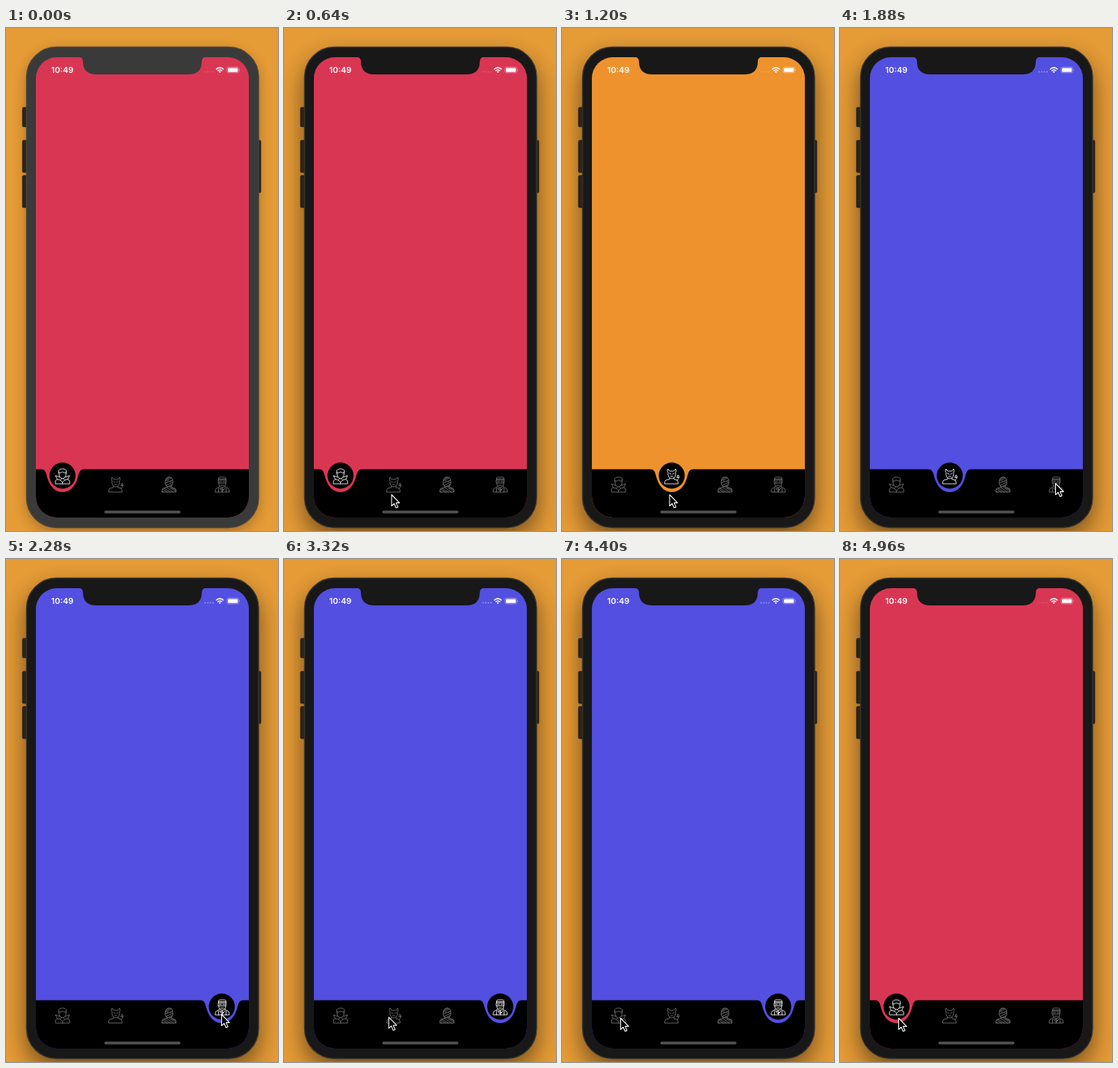
Recreate the animation shown at these times as an HTML page. Size 364 px wide and 672 px high, loop 5000 ms.

```html
<!DOCTYPE html>
<html lang="en">
<head>
<meta charset="utf-8">
<title>Curved tab bar</title>
<style>
html, body { margin: 0; width: 100%; height: 100%; overflow: hidden; background: #e59b36; }
svg { display: block; width: 100vw; height: 100vh; }
.time { font: 600 11px Inter, Roboto, sans-serif; fill: #fff; }
.icon { fill: none; stroke-width: .85; stroke-linejoin: round; stroke-linecap: round; }
</style>
</head>
<body>
<svg viewBox="0 0 364 672">
  <defs>
    <clipPath id="screen"><rect x="40" y="39" width="285" height="615" rx="28"/></clipPath>
    <filter id="wide" x="-40%" y="-20%" width="180%" height="140%"><feGaussianBlur stdDeviation="15"/></filter>
    <filter id="soft" x="-40%" y="-20%" width="180%" height="140%"><feGaussianBlur stdDeviation="9"/></filter>
  </defs>
  <rect width="364" height="672" fill="#e59b36"/>
  <rect id="shadowOn" x="25" y="38" width="315" height="644" rx="42" opacity=".46" filter="url(#wide)"/>
  <rect id="shadowOff" x="27" y="31" width="311" height="643" rx="42" opacity=".28" filter="url(#soft)"/>

  <g fill="#2b241a" stroke="#17140f" stroke-width=".6">
    <rect x="22" y="106" width="7" height="26" rx="1.5"/>
    <rect x="22" y="150" width="7" height="43" rx="1.5"/>
    <rect x="22" y="197" width="7" height="43" rx="1.5"/>
    <rect x="335" y="150" width="6" height="70" rx="1.5"/>
  </g>
  <rect id="body" x="27.5" y="25.5" width="310.5" height="642" rx="40" stroke-width="1.4"/>

  <g clip-path="url(#screen)">
    <rect class="tint" x="40" y="39" width="285" height="615"/>
    <rect x="40" y="589.5" width="285" height="65"/>
    <g id="dent">
      <path class="tint" d="M-29 589C-22 589.5-22 596-20 602C-16.500 613-9.500 620 0 620S16.500 613 20 602C22 596 22 589.500 29 589Z"/>
      <circle cy="598" r="17.400"/>
    </g>
    <g id="icons"></g>
    <rect x="131.500" y="644.700" width="102" height="3.800" rx="1.900" fill="#505050"/>
  </g>
  <path id="notch" d="M97 38.500Q103 39 103 45Q103 62 121 62H244Q262 62 262 45Q262 39 268 38.500Z"/>

  <text class="time" x="60.500" y="60">10:49</text>
  <g id="dots" fill="#fff">
    <circle cx="266.500" cy="58.500" r="1"/><circle cx="270" cy="58.500" r="1"/>
    <circle cx="273.500" cy="58.500" r="1"/><circle cx="277" cy="58.500" r="1"/>
  </g>
  <g fill="none" stroke="#fff" stroke-width="1.500">
    <path d="M281 55.200Q286.200 50.500 291.400 55.200M283 57.300Q286.200 54.600 289.400 57.300"/>
    <path d="M284.600 58.400Q286.200 57.200 287.800 58.400L286.200 60Z" fill="#fff" stroke="none"/>
  </g>
  <rect x="295.800" y="52.300" width="15.600" height="7.600" rx="2.200" fill="none" stroke="#fff" stroke-width=".7" stroke-opacity=".55"/>
  <rect x="297" y="53.400" width="13.200" height="5.400" rx="1.300" fill="#fff"/>
  <path d="M312.300 54.800Q313.700 56.100 312.300 57.400Z" fill="#fff" opacity=".6"/>

  <path id="cursor" d="M0 0V15L3.400 11.900L6 17.600L8.500 16.500L6 10.900H10.600Z" fill="#000" stroke="#fff" stroke-width="1.100" stroke-linejoin="round"/>
</svg>
<script>
const LOOP = 5000, MOVE = 420, FOCUS = 300;
const RED = '#d93654', ORANGE = '#ee922d', PURPLE = '#534fe0';

const taps = [
  { at: 750, from: 0, to: 1, color: ORANGE },
  { at: 1880, from: 1, to: 3, color: PURPLE },
  { at: 4540, from: 3, to: 0, color: RED }
];

// Pointer strokes: start, end, then both positions
const strokes = [
  [120, 480, 176, 560, 144, 623.5],
  [1230, 1680, 144, 623.5, 288.5, 608.5],
  [2715, 3660, 288.5, 608.5, 78.500, 613.5]
];

const shapes = [
  // vampire
  'M-5 -4V-7Q-5 -10 0 -10T5 -7V-4M-5 -5Q-2 -4 0 -6Q2 -4 5 -5M-4.500 -4V-1Q-3 3 0 3T4.500 -1V-4' +
  'M-4 1L-9.500 -1L-7 4L-3 5L0 8L3 5L7 4L9.500 -1L4 1M-7 4L-9.500 6V10H9.500V6L7 4M0 8V10M-3 5L-1 3M3 5L1 3',
  // devil
  'M-5 -5Q-7 -8 -5 -10Q-4 -7 -2 -7H2Q4 -7 5 -10Q7 -8 5 -5V-2Q4 3 0 3T-5 -2ZM-3 -4L-1 -3M3 -4L1 -3' +
  'M-1.500 0H1.500M-3 2V4L-8 5Q-9.500 6 -9.500 10H8.500Q8.500 6 7 5L3 4V2M7 5Q10 4 8.500 1M7 1L8.500 -2L10 1Z',
  // mummy
  'M-5 -4Q-5 -10 0 -10T5 -4V-1Q4 3 0 3T-5 -1ZM-5 -5L3 -9M-4 -7L1 -10M-5 -2L5 -6M-4 1L5 -3M-2 3L4 0M-2 -5H-1M2 -4H3' +
  'M-3 2V4L-8 5Q-9.500 6 -9.500 10H9.500Q9.500 6 8 5L3 4V2M-9 6L-2 10M-7 5L2 10M-3 4L6 10M1 4L9 9M-9 9L-7 10M4 4L9 7',
  // masked suit
  'M-5 -6V-8Q-5 -10 -3 -10H3Q5 -10 5 -8V-6M-5 -6H5V-2H-5ZM-5 -7.500H5M-4 -4H-1M1 -4H4M-4.500 -2V0Q-3 4 0 4T4.500 0V-2M-2 1H2' +
  'M-4 2L-5 4L-8 5Q-9.500 6 -9.500 10H9.500Q9.500 6 8 5L5 4L4 2M-4 4L0 9L4 4M-5 5V10M5 5V10M0 4V10M-2 5L2 7'
];

const byId = id => document.getElementById(id);
const tabX = i => 40 + 71.25 * (i + .5);
const mix = (a, b, p) => a + (b - a) * p;
const clamp = p => Math.max(0, Math.min(1, p));
const quad = p => p < .5 ? 2 * p * p : 1 - 2 * (1 - p) ** 2;
const smooth = p => p * p * (3 - 2 * p);
const place = (el, x, y) => el.setAttribute('transform', `translate(${x.toFixed(2)} ${y.toFixed(2)})`);

const icons = shapes.map(d => {
  const el = document.createElementNS('http://www.w3.org/2000/svg', 'path');
  el.setAttribute('class', 'icon');
  el.setAttribute('d', d);
  byId('icons').append(el);
  return el;
});
const tints = document.querySelectorAll('.tint');

function drawTabs(t) {
  const tap = taps.filter(s => t >= s.at).pop() || { at: -MOVE, from: 0, to: 0, color: RED };
  const p = quad(clamp((t - tap.at) / MOVE));
  place(byId('dent'), mix(tabX(tap.from), tabX(tap.to), p), 0);
  tints.forEach(el => el.setAttribute('fill', tap.color));
  byId('dots').setAttribute('opacity', tap.color === PURPLE ? .38 : .14);
  icons.forEach((el, i) => {
    const lift = i === tap.to ? (tap.from === i ? 1 : p) : i === tap.from ? 1 - p : 0;
    const shade = Math.round(mix(118, 255, lift));
    place(el, tabX(i), mix(610, 599, lift));
    el.setAttribute('stroke', `rgb(${shade},${shade},${shade})`);
  });
}

function drawPhone(t) {
  const on = t >= FOCUS, fill = on ? '#181818' : '#3a3a3a';
  byId('body').setAttribute('fill', fill);
  byId('body').setAttribute('stroke', on ? '#38342e' : '#4a443b');
  byId('notch').setAttribute('fill', fill);
  byId('shadowOn').style.display = on ? '' : 'none';
  byId('shadowOff').style.display = on ? 'none' : '';
}

function drawCursor(t) {
  const stroke = strokes.filter(s => t >= s[0]).pop();
  byId('cursor').style.display = stroke ? '' : 'none';
  if (!stroke) return;
  const [start, end, x0, y0, x1, y1] = stroke;
  const p = smooth(clamp((t - start) / (end - start)));
  place(byId('cursor'), mix(x0, x1, p), mix(y0, y1, p));
}

function draw(t) {
  drawPhone(t);
  drawTabs(t);
  drawCursor(t);
}

const begin = performance.now();
function tick() {
  draw((performance.now() - begin) % LOOP);
  requestAnimationFrame(tick);
}
tick();
</script>
</body>
</html>
```
